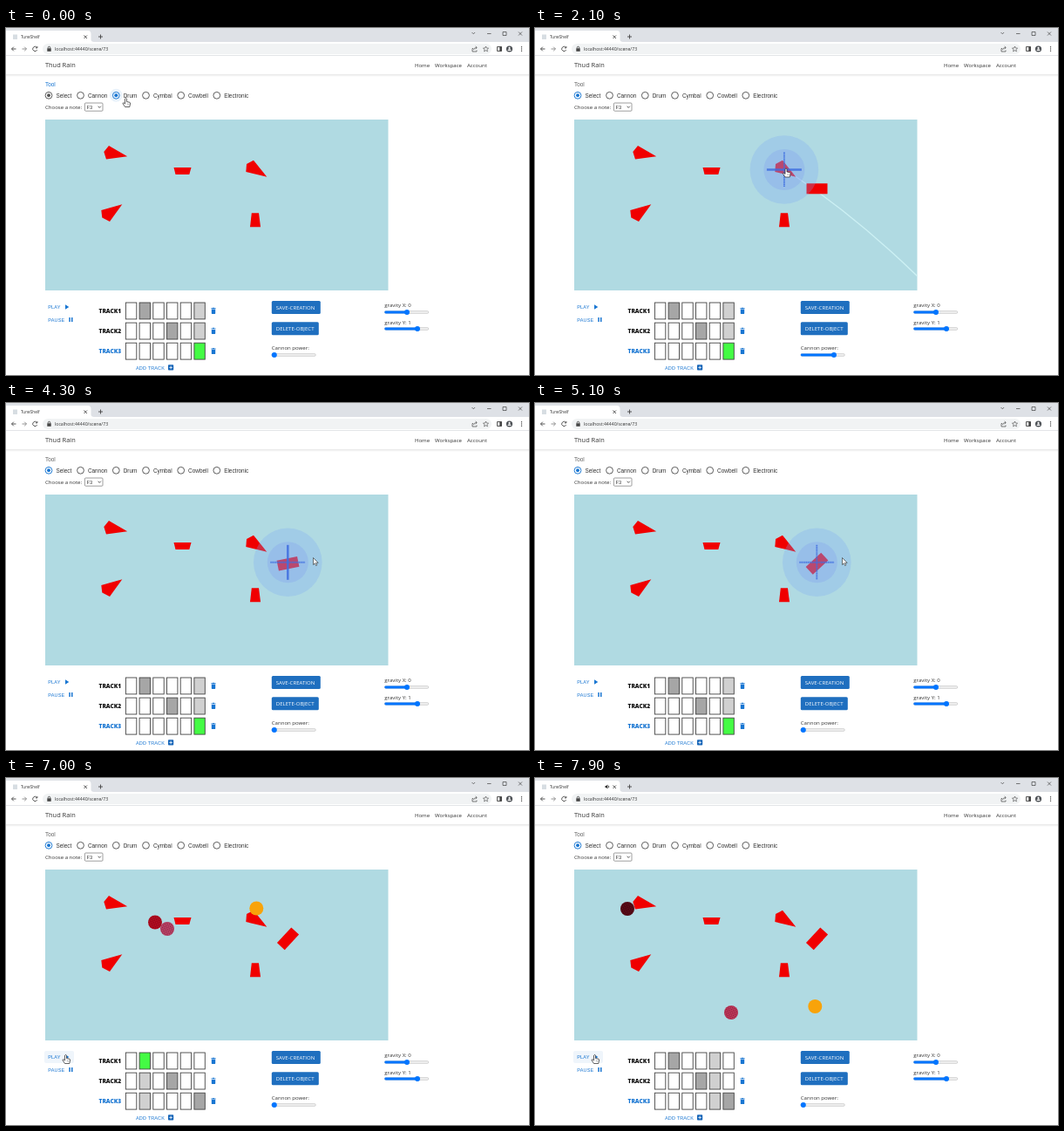
An HTML page that plays this animation: 600 by 398 pixels, repeating every 8 s.

```html
<!DOCTYPE html>
<html lang="en">
<head>
<meta charset="utf-8">
<title>TuneShelf</title>
<style>
html, body { margin: 0; width: 100%; height: 100%; overflow: hidden; background: #fff; }
svg { display: block; width: 600px; height: 398px; }
text { font-family: "Open Sans", "Noto Sans", sans-serif; font-size: 6.05px; fill: #333; white-space: pre; }
.arial text, text.arial { font-family: "Liberation Sans", Arial, sans-serif; font-size: 6.4px; }
.btn text { font-size: 5.5px; letter-spacing: .15px; fill: #1976d2; }
.line { fill: none; stroke: #444; stroke-width: .9; }
.red { fill: #f00000; }
</style>
</head>
<body>
<svg viewBox="0 0 600 398" xmlns="http://www.w3.org/2000/svg">
  <defs>
    <pattern id="mesh" width="2" height="2" patternUnits="userSpaceOnUse" patternTransform="rotate(20)">
      <rect width="1" height="1" fill="#200008" opacity=".55"/>
      <rect x="1" y="1" width="1" height="1" fill="#ff8aa8" opacity=".25"/>
    </pattern>
    <linearGradient id="shade" x2="0" y2="1">
      <stop stop-color="#000" stop-opacity=".1"/><stop offset="1" stop-color="#000" stop-opacity="0"/>
    </linearGradient>
    <clipPath id="world"><rect x="45" y="105" width="393.5" height="196"/></clipPath>
  </defs>

  <!-- browser frame -->
  <rect width="600" height="17" fill="#dee1e6"/>
  <path d="M0 17V3H94Q97.500 3 97.500 7V13Q97.500 16 101 16V17Z" fill="#fff"/>
  <rect y="16" width="600" height="16" fill="#fff"/>
  <rect x="42" y="18" width="515" height="12" rx="6" fill="#f1f3f4"/>
  <path d="M0 31.500H600" stroke="#dcdfe2" stroke-width=".8"/>
  <rect x="8" y="7.500" width="5" height="5.500" fill="#d7dde2"/>
  <text x="17" y="12" style="font-size:4.7px">TuneShelf</text>
  <g id="sound" fill="#333"><path d="M80.500 9h1.200l1.600-1.500v5l-1.600-1.500h-1.200z"/><path d="M84.200 8.700q1.300 1.300 0 2.600" class="line" stroke-width=".6"/></g>
  <text x="56" y="26" style="font-size:5.15px">localhost:44440/scene/73</text>
  <g class="line">
    <path d="M89.500 8.500l3.500 3.500m0-3.500l-3.500 3.500M106 10h5m-2.500-2.500v5"/>
    <path d="M11.500 24H6.500m2.300-2.300L6.500 24l2.300 2.300"/>
    <path d="M18.500 24h5m-2.300-2.300L23.500 24l-2.300 2.300" stroke="#888"/>
    <path d="M35.300 22.300A2.600 2.600 0 1 0 35.700 25M35.900 21v1.900H34"/>
    <path d="M48.300 23.500v-1a1.200 1.200 0 0 1 2.400 0v1"/>
    <path d="M534.500 5l1.800 1.800L538.100 5M552 6.500h4.500M570 4.500h4v4h-4zM588 4.500l4 4m0-4l-4 4" stroke-width=".7"/>
    <path d="M536 23.500h-1v3.500h5v-1.500M536.500 25q.3-2.500 3.500-2.500m-1.300-1.500l1.600 1.500-1.600 1.500" stroke-width=".7"/>
    <path d="M550.500 21l.9 2 2.200.2-1.700 1.500.5 2.200-1.900-1.200-1.900 1.200.5-2.200-1.700-1.500 2.200-.2z" stroke-width=".6"/>
    <path d="M563.500 21.500h5v5h-5z"/>
  </g>
  <rect x="47.300" y="23.300" width="4.400" height="3.500" fill="#444"/>
  <rect x="566.300" y="21.500" width="2.200" height="5" fill="#444"/>
  <circle cx="577.500" cy="24" r="3.600" fill="#4d5156"/><circle cx="577.500" cy="22.900" r="1.100" fill="#fff"/><path d="M575.400 26a2.100 1.700 0 0 1 4.200 0z" fill="#fff"/>
  <g fill="#444"><circle cx="591.500" cy="21.800" r=".7"/><circle cx="591.500" cy="24" r=".7"/><circle cx="591.500" cy="26.200" r=".7"/></g>

  <!-- page header -->
  <text x="45" y="45.300" style="font-size:7.400px">Thud Rain</text>
  <text x="469" y="45" id="home">Home</text>
  <text x="492" y="45">Workspace</text>
  <text x="529" y="45">Account</text>
  <rect y="53" width="600" height="3" fill="url(#shade)"/>

  <!-- tools -->
  <text id="tool" class="arial" x="45" y="66.800">Tool</text>
  <g id="radios" class="arial"></g>
  <text x="45" y="93">Choose a note:</text>
  <rect x="90.400" y="86" width="20.600" height="9.200" rx="1" fill="#fff" stroke="#767676" stroke-width=".7"/>
  <text x="92.500" y="92.900" class="arial" style="font-size:5.600px">F3</text>
  <path d="M105.700 89.800l1.600 1.600 1.600-1.600" class="line"/>

  <!-- scene -->
  <rect x="45" y="105" width="393.500" height="196" fill="#b0dae2"/>
  <g clip-path="url(#world)">
    <path id="aim" d="M297 169Q368 216 439 285" fill="none" stroke="#cdf1f4" stroke-width="1.300"/>
    <g class="red">
      <path d="M118 135L139.200 147.200 115 150.500 112.300 142Z"/>
      <path d="M133.300 202.300L119 222 110.300 217.500 109.300 209Z"/>
      <path d="M284 151.800L299.300 170.800 275.300 165 276 156Z"/>
      <path d="M192.500 160H212.500L210.300 168H194.500Z"/>
      <path d="M281.800 212.300H290L292 228.200H280Z"/>
      <rect id="drum" x="-12" y="-6" width="24" height="12"/>
    </g>
    <g id="ring">
      <circle r="39.300" fill="#7ba4f2" opacity=".28"/>
      <circle r="23.500" fill="#7a92f0" opacity=".25"/>
      <path id="barX" d="M-20 0H20" stroke="#3f6fe0" opacity=".85"/>
      <path id="barY" d="M0-20V20" stroke="#3f6fe0" opacity=".85"/>
    </g>
    <g id="balls"></g>
  </g>

  <!-- transport -->
  <rect id="hover" x="44" y="313" width="34" height="14" rx="2" fill="#eff5fb"/>
  <g class="arial btn">
    <text x="48.300" y="322">PLAY</text><text x="48.300" y="336.500">PAUSE</text><text x="149" y="391.500">ADD TRACK</text>
  </g>
  <path d="M68 317.300l4.300 2.700-4.300 2.700zM72.300 332h1.500v5h-1.500zM75 332h1.500v5H75z" fill="#1976d2"/>
  <rect x="186" y="386.300" width="6.200" height="6.200" rx=".8" fill="#1565b8"/>
  <path d="M187.300 389.400h3.600m-1.800-1.800v3.600" stroke="#fff" stroke-width=".8"/>
  <g id="tracks"></g>

  <!-- controls -->
  <rect x="304.800" y="313" width="56" height="15" rx="1.500" fill="#1f6fbf"/>
  <rect x="304.800" y="337.300" width="54" height="15" rx="1.500" fill="#1f6fbf"/>
  <text x="309.800" y="322.800" style="fill:#fff">SAVE-CREATION</text>
  <text x="309.800" y="347" style="fill:#fff">DELETE-OBJECT</text>
  <text x="304.800" y="368.500">Cannon power:</text>
  <text x="434.300" y="319.800">gravity X: 0</text>
  <text x="434.300" y="339.500">gravity Y: 1</text>
  <g id="sliders"></g>

  <g id="hand"><path d="M-1 .7Q0-.8 1 .7V4L4.500 4.800Q5.300 5 5 6.500L4.300 10H-1L-3.400 6.300Q-3.700 5-2.300 5.400L-1 6.500Z" fill="#fff" stroke="#222" stroke-width=".7"/><path d="M1.800 6v1.800M3.200 6.200V8" stroke="#555" stroke-width=".4"/></g>
  <path id="arrow" d="M0 0V8L1.900 6.300 3.100 9 4.400 8.400 3.200 5.800H5.700Z" fill="#fff" stroke="#222" stroke-width=".6"/>
</svg>
<script>
const LOOP = 8000, STEP = 100, GRAVITY = 400, BLUE = '#1976d2';
const $ = id => document.getElementById(id);

function add(parent, tag, attrs, text) {
  const el = document.createElementNS('http://www.w3.org/2000/svg', tag);
  set(el, attrs);
  if (text) el.textContent = text;
  parent.appendChild(el);
  return el;
}
function set(el, attrs) { for (const k in attrs) el.setAttribute(k, attrs[k]); }
const show = (el, on) => { el.style.display = on ? '' : 'none'; };
const move = (el, x, y, a = 0) => set(el, { transform: `translate(${x} ${y}) rotate(${a})` });
const clamp = (v, lo, hi) => Math.min(hi, Math.max(lo, v));
const within = (t, from, to) => t >= from && t < to;

// radio buttons
const radios = [['Select', 49], ['Cannon', 85.5], ['Drum', 126.3], ['Cymbal', 160.5], ['Cowbell', 200.7], ['Electronic', 241.8]]
  .map(([name, x]) => {
    const at = { cx: x, cy: 77.3 };
    const halo = add($('radios'), 'circle', { ...at, r: 7.5, fill: BLUE, opacity: .09 });
    const ring = add($('radios'), 'circle', { ...at, r: 3.9, fill: 'none', 'stroke-width': .95 });
    const dot = add($('radios'), 'circle', { ...at, r: 1.95 });
    add($('radios'), 'text', { x: x + 8.4, y: 79.5 }, name);
    return { halo, ring, dot };
  });

// step sequencer
const notes = [1, 3, 5];
const cells = notes.map((note, row) => {
  const g = $('tracks'), y = 315 + row * 23.1;
  const label = add(g, 'text', { x: 106.5, y: y + 11.8 }, 'TRACK' + (row + 1));
  label.style.cssText = `font-weight:800;font-size:6.6px;fill:${row === 2 ? BLUE : '#111'}`;
  add(g, 'path', { transform: `translate(238 ${y + 9.4})`, fill: BLUE,
    d: 'M-2.6-3.100H-1.200L-.7-3.700H.7L1.200-3.100H2.600V-2.200H-2.600ZM-2.200-1.600H2.200V2.800Q2.200 3.500 1.500 3.500H-1.500Q-2.200 3.500-2.200 2.800Z' });
  return Array.from({ length: 6 }, (_, col) => add(g, 'rect',
    { x: 137.4 + col * 15.7, y, width: 12.4, height: 18.9, stroke: '#444', 'stroke-width': .9 }));
});

function slider(x, y) {
  const g = $('sliders');
  add(g, 'rect', { x, y: y - 1.4, width: 50.5, height: 2.8, rx: 1.4, fill: '#efefef', stroke: '#b5b5b5', 'stroke-width': .5 });
  const bar = add(g, 'rect', { x, y: y - 1.4, height: 2.8, rx: 1.4, fill: '#0075ff' });
  const knob = add(g, 'circle', { cy: y, r: 3, fill: '#0075ff' });
  return v => {
    const px = 3 + v * 44.5;
    set(bar, { width: px });
    set(knob, { cx: x + px });
  };
}
const power = slider(304.8, 375);
slider(434.3, 326)(.51);
slider(434.3, 345)(.78);

// each ball hops between [time, x, y] contacts under gravity
const balls = [
  { path: [[6800, 130, 145], [7000, 171, 165.5], [7900, 106, 150]], from: [176, 6, 26], to: [80, 4, 16], mesh: .6 },
  { path: [[6800, 122, 211], [7000, 185, 173], [7900, 225, 269]], from: [186, 62, 100], to: [190, 50, 86], mesh: .8 },
  { path: [[6500, 290, 164], [6600, 306, 174], [7000, 287.3, 149.5], [7900, 321.3, 262]], from: [248, 163, 10], to: [248, 163, 10], mesh: 0 }
].map(b => {
  const g = add($('balls'), 'g', {});
  b.el = g;
  b.disc = add(g, 'circle', { r: 8 });
  add(g, 'circle', { r: 7.8, fill: 'url(#mesh)', opacity: b.mesh });
  return b;
});

function segment(keys, t) {
  let i = 0;
  while (i < keys.length - 2 && t >= keys[i + 1][0]) i++;
  const a = keys[i], b = keys[i + 1];
  return { a, b, u: clamp((t - a[0]) / (b[0] - a[0]), 0, 1) };
}
const mix = (a, b, u) => a + (b - a) * u;

function drawBall(ball, t) {
  const on = t >= ball.path[0][0];
  show(ball.el, on);
  if (!on) return;
  const { a, b, u } = segment(ball.path, t), span = (b[0] - a[0]) / 1000;
  const y = mix(a[2], b[2], u) - GRAVITY / 2 * span * span * u * (1 - u);
  const spin = ball.mesh ? (t - 7000) * .1 : 0;
  move(ball.el, mix(a[1], b[1], u), y, spin);
  const fade = clamp((t - 7000) / 900, 0, 1);
  set(ball.disc, { fill: `rgb(${ball.from.map((c, i) => Math.round(mix(c, ball.to[i], fade)))})` });
}

const pointer = [
  [0, 137.5, 80.5], [100, 137.5, 80.5], [700, 323, 183], [900, 323, 183], [1400, 50, 76], [1600, 50, 76],
  [2000, 288, 161], [2200, 288, 161], [2600, 345, 215], [2700, 345, 215], [3100, 332.5, 187], [3350, 332.5, 187],
  [3700, 352.5, 177.5], [5300, 352.5, 177.5], [5800, 30, 302], [6000, 67.5, 319.5], [6300, 67.5, 319.5], [6500, 68.5, 317.5]
];
const handTimes = [[0, 200], [1400, 1700], [2000, 2300], [3000, 3500], [5900, LOOP]];

function drawPointer(t) {
  const { a, b, u } = segment(pointer, t), e = u * u * (3 - 2 * u);
  const x = mix(a[1], b[1], e), y = mix(a[2], b[2], e);
  const isHand = handTimes.some(([from, to]) => within(t, from, to));
  show($('hand'), isHand);
  show($('arrow'), !isHand);
  move($(isHand ? 'hand' : 'arrow'), x, y);
}

function drawTools(t) {
  const picked = within(t, 0, 1500) ? 2 : 0;
  const focused = t < 800 || within(t, 1500, 2000);
  $('tool').style.fill = focused ? BLUE : '#666';
  radios.forEach(({ halo, ring, dot }, i) => {
    const color = i === picked ? BLUE : '#555';
    set(ring, { stroke: color });
    set(dot, { fill: color });
    show(dot, i === picked || (i === 0 && t < 100));
    show(halo, (i === 2 && t < 200) || (i === 0 && within(t, 1400, 1700)));
  });
}

function drawTracks(t) {
  const now = t < 6500 ? 5 : Math.floor((t - 6500) / 300) % 6;
  cells.forEach((row, r) => row.forEach((cell, c) => {
    const note = notes[r] === c, live = c === now;
    set(cell, { fill: note ? (live ? '#44fb44' : '#a6a6a6') : live ? '#d0d0d0' : '#fff' });
  }));
}

function drawScene(t) {
  const onCannon = within(t, 2000, 2700), onDrum = within(t, 3300, 6300);
  const angle = -clamp((t - 4000) * .039, 0, 47);
  show($('drum'), t >= 800);
  move($('drum'), 323.5, 184.3, angle);
  show($('aim'), onCannon);
  power(onCannon ? .79 : 0);
  show($('ring'), onCannon || onDrum);
  move($('ring'), onCannon ? 285.9 : 323.3, onCannon ? 162.5 : 182.8);
  const bar = solid => ({ 'stroke-width': solid ? 2.6 : 1.9, 'stroke-dasharray': solid ? 'none' : '1.4 .5' });
  set($('barX'), bar(onCannon));
  set($('barY'), bar(onDrum && angle > -40));
  balls.forEach(b => drawBall(b, t));
}

function draw(ms) {
  const t = Math.floor(ms % LOOP / STEP) * STEP;
  drawTools(t);
  drawTracks(t);
  drawScene(t);
  show($('hover'), t >= 5900);
  show($('sound'), t >= 7200);
  drawPointer(t);
}

const start = performance.now();
function tick() {
  draw(performance.now() - start);
  requestAnimationFrame(tick);
}
tick();
</script>
</body>
</html>
```
